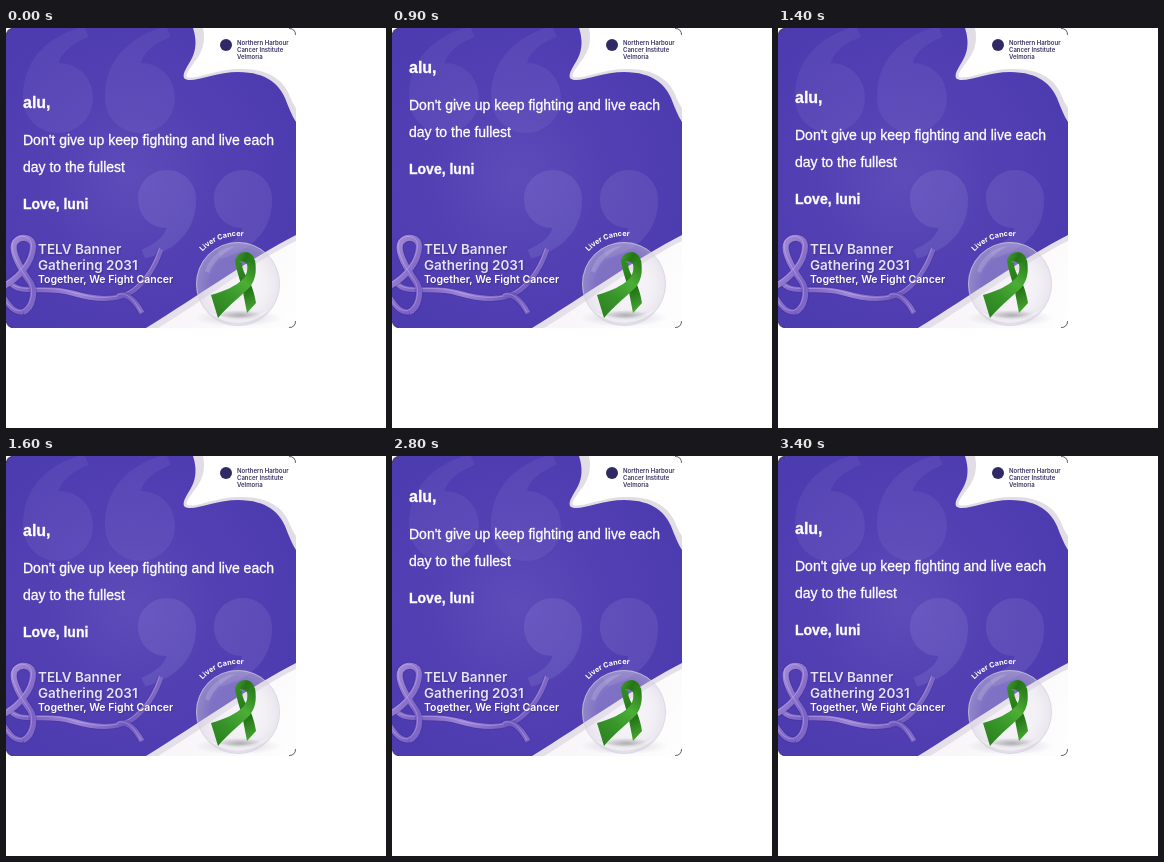
Recreate the animation shown at these times as an HTML page with a canvas. Size 380 by 400 pixels, loop 3.5 s.

```html
<!DOCTYPE html>
<html lang="en">
<head>
<meta charset="utf-8">
<title>Message card</title>
<style>
html, body { margin: 0; width: 100%; height: 100%; overflow: hidden; background: #fff; }
canvas { display: block; width: 380px; height: 400px; }
</style>
</head>
<body>
<canvas id="stage" width="380" height="400"></canvas>
<script>
const W = 380, H = 400, CARD_W = 290, CARD_H = 300;
const LOOP = 3500, TICK = 100, RISE = 53;
const SANS = '"Liberation Sans", Arial, sans-serif';
const TITLE = 'Inter, "Open Sans", sans-serif';
const ctx = document.getElementById('stage').getContext('2d');

function fillPath(c, d, style) {
  c.fillStyle = style;
  c.fill(new Path2D(d));
}

function strokePath(c, d, style, width) {
  c.strokeStyle = style;
  c.lineWidth = width;
  c.stroke(new Path2D(d));
}

function write(c, str, x, y, font, color = '#fff') {
  c.font = font;
  c.fillStyle = color;
  c.fillText(str, x, y);
}

function ramp(g, ...colors) {
  colors.forEach((col, i) => g.addColorStop(i / (colors.length - 1), col));
  return g;
}

function disc(c, x, y, r, style) {
  c.fillStyle = style;
  c.beginPath();
  c.arc(x, y, r, 0, Math.PI * 2);
  c.fill();
}

// Quote mark: round bulb with a tail; turn = PI gives the closing form.
function quote(c, x, y, r, turn, alpha) {
  c.save();
  c.translate(x, y);
  c.rotate(turn);
  c.scale(r, r);
  fillPath(c, 'M-1 0 C-1.02 -1 -.4 -1.75 .75 -2.05 L.88 -1.75 C.4 -1.55 .1 -1.3 .02 -1 ' +
    'C.6 -1 1 -.55 1 0 C1 .56 .56 1 0 1 C-.56 1 -1 .56 -1 0 Z', `rgba(255,255,255,${alpha})`);
  c.restore();
}

function drawBackground(c) {
  c.fillStyle = ramp(c.createRadialGradient(125, 150, 5, 125, 150, 165), '#5d4bb9', '#5341b4', '#4d3bb0');
  c.fillRect(0, 0, CARD_W, CARD_H);
  quote(c, 52, 70, 35, 0, 0.05);
  quote(c, 134, 70, 35, 0, 0.05);
  quote(c, 161, 171, 29, Math.PI, 0.08);
  quote(c, 237, 171, 29, Math.PI, 0.08);

  fillPath(c, 'M187 0 C191 12 190 22 186 30 C182 38 176 45 178 50 C184 57 208 44 232 44 ' +
    'C262 44 274 58 279 70 C283 80 286 88 290 94 V0 Z', '#e2dce4');
  fillPath(c, 'M197 0 C200 14 196 24 190 32 C185 39 179 46 181 49 C190 52 210 41 234 41 ' +
    'C262 40 276 52 282 64 C285 71 287 76 290 80 V0 Z', '#fff');

  fillPath(c, 'M290 207 C248 228 192 268 140 300 H290 Z', '#e4dfe9');
  fillPath(c, 'M290 213 C252 231 200 271 152 300 H290 Z',
    ramp(c.createLinearGradient(200, 250, 290, 290), '#f8f6f9', '#fefefe'));
}

function drawLogo(c) {
  disc(c, 220, 17, 6, '#2f2a66');
  ['Northern Harbour', 'Cancer Institute', 'Velmoria'].forEach((line, i) =>
    write(c, line, 231, 17 + i * 7, `600 6px ${TITLE}`, '#37325f'));
}

function drawStreamer(c) {
  const tint = ramp(c.createLinearGradient(0, 210, 160, 285), '#a78fd8', '#7a61c4', '#9c84d4', '#7059bd', '#9a82d2');
  const bands = [
    ['M4 254 C12 268 40 257 66 265 C90 272 112 274 128 262 C143 250 150 236 155 221', 5],
    ['M112 268 C122 264 130 274 136 285', 5],
    ['M17 284 C8 285 2 276 -2 270', 5],
    ['M-2 258 C12 250 27 235 27 218 C26 209 15 207 9 214 C4 222 14 240 24 254 C30 263 27 280 17 284', 6]
  ];
  c.lineCap = 'butt';
  for (const [d, w] of bands) {
    strokePath(c, d, 'rgba(60,40,140,.25)', w + 2);
    strokePath(c, d, tint, w);
    c.save();
    c.translate(-w / 4, -w / 4);
    strokePath(c, d, 'rgba(220,206,248,.35)', 1);
    c.restore();
  }
}

function drawTitle(c) {
  c.save();
  c.shadowColor = 'rgba(40,25,100,.45)';
  c.shadowBlur = 2;
  c.shadowOffsetX = c.shadowOffsetY = 1;
  write(c, 'TELV Banner', 32, 226, `600 13.5px ${TITLE}`, '#e6e1f5');
  write(c, 'Gathering 2031', 32, 242, `600 13.5px ${TITLE}`, '#e6e1f5');
  write(c, 'Together, We Fight Cancer', 32, 255, `600 10.5px ${TITLE}`);
  c.restore();
}

function arcText(c, str, cx, cy, r, from, font) {
  c.font = font;
  let turn = from;
  for (const ch of str) {
    const w = c.measureText(ch).width;
    turn += w / 2 / r;
    c.save();
    c.translate(cx, cy);
    c.rotate(turn);
    write(c, ch, -w / 2, -r, font);
    c.restore();
    turn += w / 2 / r;
  }
}

function drawBubble(c) {
  const x = 232, y = 256, r = 42;
  c.save();
  c.translate(x, 290);
  c.scale(1, 0.2);
  disc(c, 0, 0, 44, ramp(c.createRadialGradient(0, 0, 5, 0, 0, 44), 'rgba(90,80,110,.2)', 'rgba(90,80,110,0)'));
  c.restore();

  disc(c, x, y, r, ramp(c.createRadialGradient(x, y, 12, x, y, r),
    'rgba(235,231,240,.3)', 'rgba(225,220,233,.32)', 'rgba(212,206,222,.5)'));
  c.strokeStyle = 'rgba(214,208,226,.6)';
  c.lineWidth = 1;
  c.beginPath();
  c.arc(x, y, r - 0.5, 0, Math.PI * 2);
  c.stroke();
  fillPath(c, 'M199 243 C204 227 218 219 230 218 C219 224 209 231 203 245 Z', 'rgba(255,255,255,.15)');
  fillPath(c, 'M203 284 C220 299 247 298 262 282 C248 291 221 292 203 284 Z', 'rgba(255,255,255,.5)');

  c.save();
  c.translate(234, 287);
  c.scale(1, 0.22);
  disc(c, 0, 0, 22, ramp(c.createRadialGradient(0, 0, 2, 0, 0, 22), 'rgba(50,60,50,.25)', 'rgba(50,60,50,0)'));
  c.restore();

  // Back strand, loop, then the front strand.
  fillPath(c, 'M229 231 C230 243 235 254 237 264 L241 285 L250 275 C248 262 244 253 239 246 C237 242 236 239 236 235 Z',
    ramp(c.createLinearGradient(229, 240, 249, 284), '#2f8a20', '#237216', '#4bab35'));
  fillPath(c, 'M229 234 C229 228 234 224 240 224 C246 225 249 229 249 236 L242 238 C240 233 234 232 229 234 Z',
    ramp(c.createLinearGradient(229, 226, 249, 236), '#3f9f2c', '#257417', '#2f8920'));
  fillPath(c, 'M249 232 C251 245 249 252 244 259 C236 267 222 278 212 290 L205 267 C219 263 230 258 237 251 C241 247 242 241 241 235 Z',
    ramp(c.createLinearGradient(248, 235, 208, 285), '#2b7f1d', '#4cae35', '#37952a', '#2d8220'));

  arcText(c, 'Liver Cancer', x, y, 48, -0.83, `700 7.3px ${TITLE}`);
}

function makeCard() {
  const layer = document.createElement('canvas');
  layer.width = W;
  layer.height = H;
  const c = layer.getContext('2d');
  c.fillStyle = '#fff';
  c.fillRect(0, 0, W, H);
  c.save();
  c.beginPath();
  c.roundRect(0, 0, CARD_W, CARD_H, 8);
  c.clip();
  drawBackground(c);
  drawLogo(c);
  drawStreamer(c);
  drawTitle(c);
  drawBubble(c);
  c.restore();
  for (const d of ['M.5 7 Q.5 .5 7 .5', 'M283 .5 Q289.5 .5 289.5 7',
    'M.5 293 Q.5 299.5 7 299.5', 'M283 299.5 Q289.5 299.5 289.5 293']) {
    strokePath(c, d, 'rgba(20,16,40,.6)', 1);
  }
  return layer;
}

// Quadratic ease-out over one second, back to rest.
function slide(ms) {
  const left = 1 - Math.min(Math.max(ms / 1000, 0), 1);
  return -Math.round(RISE * left * left);
}

function offsetAt(t) {
  if (t < 700) return 0;
  if (t < 1600) return slide(t - 715);
  if (t < 2600) return 0;
  return slide(t - 2600);
}

// Message lines carry a hairline outline for a slightly fuller weight.
function message(str, y, font) {
  write(ctx, str, 17, y, font);
  ctx.strokeStyle = '#fff';
  ctx.lineWidth = 0.3;
  ctx.strokeText(str, 17, y);
}

const card = makeCard();
const start = performance.now();

function draw(now) {
  const t = Math.max(0, now - start) % LOOP;
  const dy = offsetAt(Math.floor(t / TICK) * TICK);
  ctx.drawImage(card, 0, 0);
  message('alu,', 80 + dy, `bold 16px ${SANS}`);
  message("Don't give up keep fighting and live each", 117 + dy, `14px ${SANS}`);
  message('day to the fullest', 144 + dy, `14px ${SANS}`);
  message('Love, luni', 181 + dy, `bold 14px ${SANS}`);
  requestAnimationFrame(draw);
}
draw(start);
</script>
</body>
</html>
```
